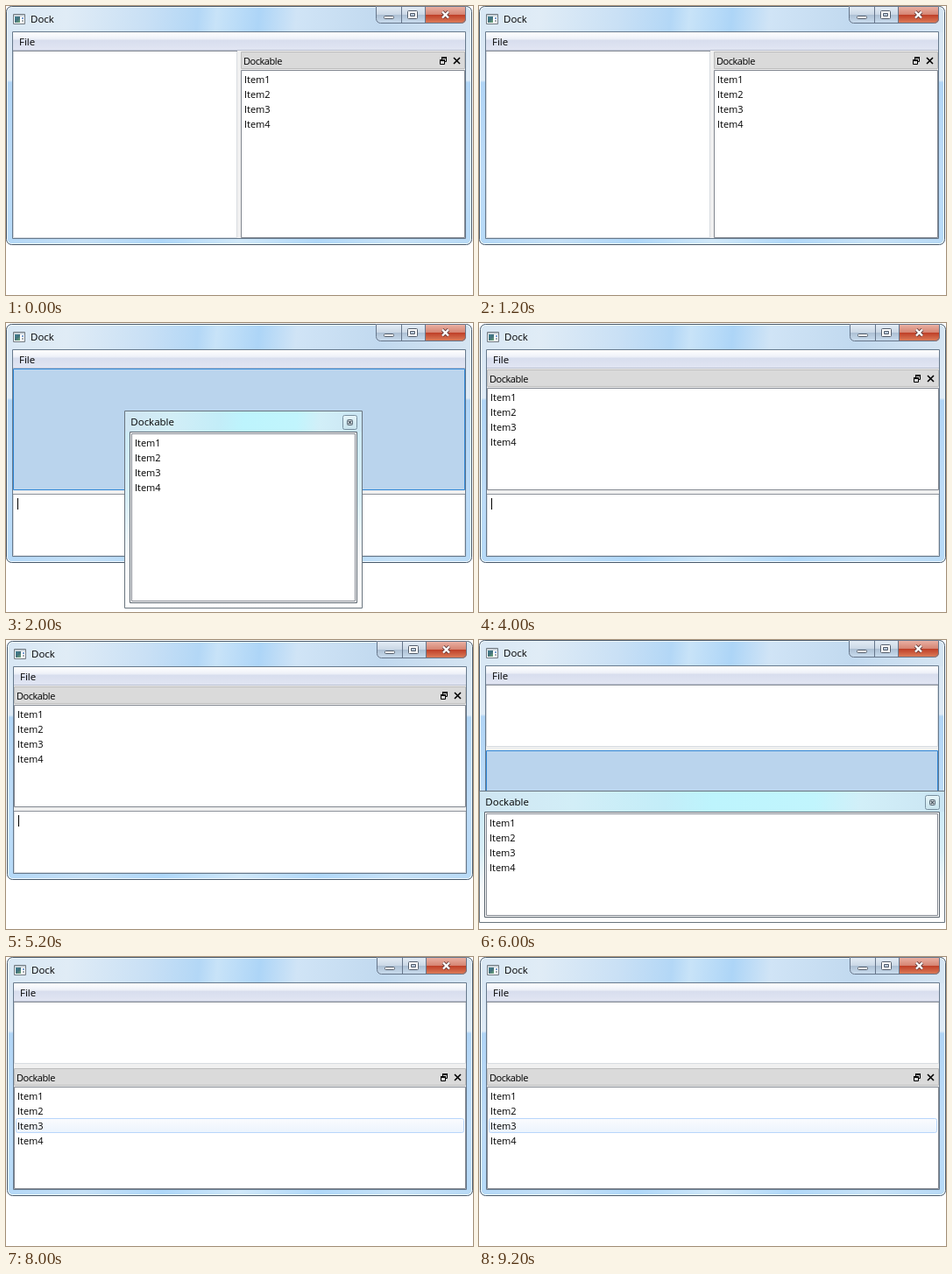
These frames come from a looping animation (533 px wide and 330 px high, 10 s). An HTML page with a canvas:

```html
<!DOCTYPE html>
<html lang="en">
<head>
<meta charset="utf-8">
<title>Dock</title>
<style>
html, body { margin: 0; width: 100%; height: 100%; overflow: hidden; background: #fff; }
canvas { display: block; }
</style>
</head>
<body>
<canvas id="stage" width="533" height="330"></canvas>
<script>
const c = document.getElementById('stage').getContext('2d');
const EDGE = '#828790';

// Gradient from evenly spaced colours, or from [offset, colour] pairs.
function blend(x0, y0, x1, y1, ...stops) {
  const g = c.createLinearGradient(x0, y0, x1, y1);
  stops.forEach((s, i) => Array.isArray(s)
    ? g.addColorStop(s[0], s[1])
    : g.addColorStop(i / (stops.length - 1), s));
  return g;
}

function fill(x, y, w, h, color) {
  c.fillStyle = color;
  c.fillRect(x, y, w, h);
}

// Box with a one pixel border inside its bounds.
function box(x, y, w, h, paint, edge, r = 0) {
  c.beginPath();
  c.roundRect(x + .5, y + .5, w - 1, h - 1, r);
  c.fillStyle = paint;
  c.fill();
  c.strokeStyle = edge;
  c.lineWidth = 1;
  c.stroke();
}

function text(s, x, y, size = 11.5, spacing = 0) {
  c.font = `${size}px "Open Sans", "Noto Sans", sans-serif`;
  c.letterSpacing = spacing + 'px';
  c.fillStyle = '#000';
  c.fillText(s, x, y);
}

function cross(x, y, r, color, width) {
  c.beginPath();
  c.moveTo(x - r, y - r); c.lineTo(x + r, y + r);
  c.moveTo(x + r, y - r); c.lineTo(x - r, y + r);
  c.strokeStyle = color;
  c.lineWidth = width;
  c.stroke();
}

function items(x, y) {
  for (let i = 0; i < 4; i++) text('Item' + (i + 1), x, y + i * 17, 11);
}

function captionButtons() {
  c.save();
  c.beginPath();
  c.roundRect(422, 0, 103, 20, [0, 0, 5, 5]);
  c.clip();
  const glass = blend(0, 1, 0, 19, [0, '#e3ecf5'], [.48, '#cbd8e6'], [.5, '#acbfd3'], [1, '#c8dbed']);
  const red = blend(0, 1, 0, 19, [0, '#e9b0a3'], [.48, '#d68573'], [.5, '#be3d26'], [1, '#db7b58']);
  fill(422, 0, 56, 20, glass);
  fill(478, 0, 47, 20, red);
  c.restore();
  c.beginPath();
  c.roundRect(422.5, .5, 102, 19, [0, 0, 5, 5]);
  c.moveTo(451.5, 1); c.lineTo(451.5, 19);
  c.moveTo(478.5, 1); c.lineTo(478.5, 19);
  c.strokeStyle = '#65758a';
  c.lineWidth = 1;
  c.stroke();
  box(431, 11, 12, 4, '#fff', '#535d6b', 1);
  box(458, 5, 12, 10, '#fff', '#535d6b', 1);
  box(461, 8, 6, 4, '#b9c9da', '#535d6b');
  cross(501.5, 10, 3.5, '#683e3c', 4);
  cross(501.5, 10, 3.5, '#fff', 2.4);
}

function mainWindow() {
  const shape = () => { c.beginPath(); c.roundRect(.5, .5, 531, 272, 6); };
  c.save();
  shape();
  c.clip();
  fill(0, 0, 532, 273, blend(0, 0, 0, 273, [0, '#d0e2f3'], [.11, '#d9e7f4'],
    [.31, '#dfebf6'], [.32, '#b1d5f6'], [.7, '#bedcf7'], [1, '#b6daf8']));
  fill(0, 0, 532, 30, blend(0, 0, 532, 50, [0, '#d8e7f4'], [.13, '#e0ecf6'], [.3, '#c9e0f5'],
    [.41, '#b3d7f6'], [.45, '#c8e3f8'], [.54, '#add5f7'], [.62, '#d0e4f6'], [.8, '#c1d9ef'], [1, '#d6e5f2']));
  fill(0, 265, 532, 8, blend(0, 0, 532, 0, '#b4d8f7', '#c5e0f6', '#aed7f9', '#d0e8f9', '#b0d8f9', '#c7e2f7', '#b8daf6'));
  shape();
  c.strokeStyle = '#eff8ff';
  c.lineWidth = 3;
  c.stroke();
  c.restore();
  shape();
  c.strokeStyle = '#48596b';
  c.lineWidth = 1;
  c.stroke();

  box(8, 9, 14, 12, '#fff', '#6f7880');
  fill(9, 10, 12, 2, '#cbd3d9');
  fill(10, 12, 6, 7, blend(10, 12, 16, 19, '#3f8396', '#43707c', '#74ad7a'));
  fill(18, 13, 2, 2, '#759cd0');
  fill(18, 16, 2, 2, '#a3aab0');
  text('Dock', 28, 19);
  captionButtons();

  box(7, 29, 518, 237, '#f0f0f0', '#66798c');
  fill(8, 30, 516, 21, blend(0, 30, 0, 51, [0, '#fff'], [.35, '#eef1f8'], [.45, '#d8deee'], [1, '#e2e6f3']));
  fill(8, 50, 516, 1, '#b8becf');
  text('File', 15, 45);
}

function edit(x, y, w, h, caret) {
  box(x, y, w, h, '#fff', '#d8dce1');
  fill(x, y, w, 1, '#8d929b');
  if (caret) fill(x + 5, y + 5, 1, 13, '#000');
}

function dock(x, y, w, h, hover) {
  box(x, y, w, 20, '#dadada', '#bcbcbc');
  text('Dockable', x + 3, y + 15, 11, -.45);
  const r = x + w, m = y + 7;
  box(r - 27, m - 1, 6, 6, '#dadada', '#000');
  fill(r - 27, m - 1, 6, 2, '#000');
  box(r - 29, m + 2, 6, 6, '#dadada', '#000');
  fill(r - 29, m + 2, 6, 2, '#000');
  cross(r - 9.5, m + 3.5, 3.5, '#000', 1.6);

  const top = y + 21;
  box(x, top, w, h - 21, '#fff', EDGE);
  if (hover) box(x + 2, top + 36, w - 4, 17, blend(0, top + 36, 0, top + 53, '#fbfcfe', '#ebf3fd'), '#b8d6fb', 2);
  items(x + 4, top + 15);
}

function target(y, h) {
  box(8, y, 516, h, '#bad4ed', '#2f86d6');
}

function floating(x, y, w, h) {
  box(x, y, w, h, '#f5f7f8', '#69747e');
  fill(x + 1, y + 1, w - 2, h - 2, blend(0, y, 0, y + h, [0, '#c9e9f6'], [.45, '#d8eef7'], [.75, '#f8fafb'], [1, '#fff']));
  fill(x + 1, y + 1, w - 2, 23, blend(x, y, x + w, y + 24, [0, '#cfe5f2'], [.2, '#d2eef7'],
    [.4, '#c3edf8'], [.5, '#bdf4fd'], [.72, '#c1f5fd'], [.82, '#d2eff8'], [1, '#cae5f3']));
  text('Dockable', x + 7.3, y + 17);
  box(x + w - 23, y + 5, 17, 17, blend(0, y + 5, 0, y + 22, '#e8f6fa', '#c6e3ed'), '#7890a0', 2);
  box(x + w - 18, y + 10, 7, 7, '#f5fbfd', '#596b78', 1);
  cross(x + w - 14.5, y + 13.5, 2, '#45525d', 1.2);
  box(x + 6, y + 24, w - 12, h - 30, '#fff', '#59636d');
  box(x + 8, y + 26, w - 16, h - 34, '#fff', EDGE);
  items(x + 12, y + 41);
}

// Each scene: window offset, then its contents.
const scenes = [
  [0, 0, () => {
    edit(8, 51, 256, 214);
    dock(268, 52, 256, 213);
  }],
  [0, 1, () => {
    target(51, 139);
    edit(8, 194, 516, 71, true);
    floating(135, 99, 272, 226);
  }],
  [1, 1, () => {
    dock(8, 52, 516, 138);
    edit(8, 194, 516, 71, true);
  }],
  [0, 0, () => {
    edit(8, 51, 516, 71);
    target(126, 139);
    floating(0, 172, 532, 151);
  }],
  [1, 0, () => {
    edit(8, 51, 516, 71);
    dock(8, 127, 516, 138, true);
  }]
];

function draw() {
  const [dx, dy, content] = scenes[Math.floor(performance.now() % 10000 / 2000)];
  c.setTransform(1, 0, 0, 1, 0, 0);
  fill(0, 0, 533, 330, '#fff');
  c.translate(dx, dy);
  mainWindow();
  content();
  requestAnimationFrame(draw);
}
draw();
</script>
</body>
</html>
```
